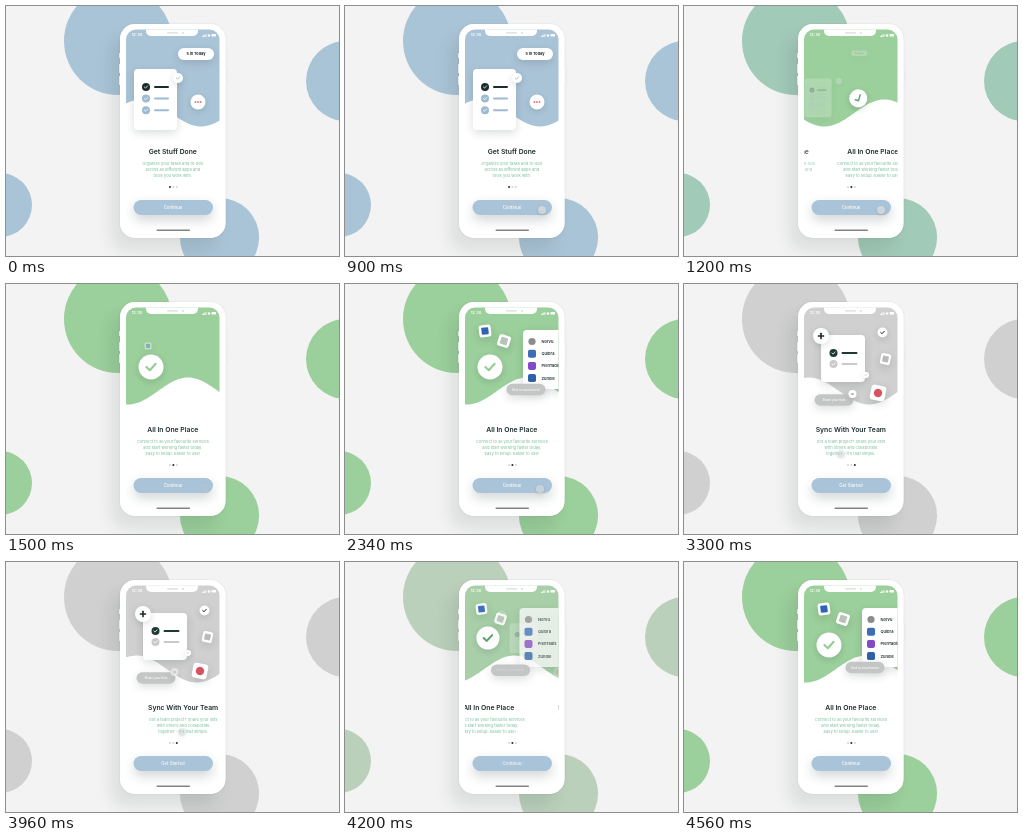
An HTML page with a canvas that plays this animation: 333 px wide and 250 px high, repeating every 4620 ms.

```html
<!DOCTYPE html>
<html lang="en">
<head>
<meta charset="utf-8">
<title>Onboarding</title>
<style>
html, body { margin: 0; width: 100%; height: 100%; overflow: hidden; background: #f3f3f3; }
canvas { display: block; width: 333px; height: 250px; }
</style>
</head>
<body>
<canvas id="stage"></canvas>
<script>
const W = 333, H = 250, LOOP = 4620, STEP = 60;
const canvas = document.getElementById('stage');
const g = canvas.getContext('2d');
const dpr = window.devicePixelRatio || 1;
canvas.width = W * dpr;
canvas.height = H * dpr;

const BLUE = [170, 196, 215], GREEN = [155, 207, 155], GREY = [208, 208, 208];
const INK = '#1c2b2b', BUTTON = '#a9c4d8', COPY = '#78bf9c', SOFT = '#c4c6c5';
// x: scroll position of the page, wave: how far the wave has travelled there.
const PAGES = [
  { x: 0, wave: 0, title: 'Get Stuff Done',
    copy: ['Organize your tasks and to-dos', 'across all different apps and', 'tools you work with.'] },
  { x: 88, wave: 73, title: 'All In One Place',
    copy: ['Connect to all your favourite services', 'and start working faster today.', 'Easy to setup. Easier to use!'] },
  { x: 192, wave: 130, title: 'Sync With Your Team',
    copy: ['Got a team project? Share your lists', 'with others and collaborate', "together - it's that simple."] }
];
const APPS = [['Norvu', '#8c8c8c'], ['Quibra', '#3d6db4'], ['PlenTadis', '#8449c4'], ['Zundle', '#2f62a8']];

const clamp = v => Math.max(0, Math.min(1, v));
const lerp = (a, b, k) => a + (b - a) * k;
const ramp = (t, a, b) => clamp((t - a) / (b - a));
const inOut = u => u < .5 ? 2 * u * u : 1 - 2 * (1 - u) ** 2;
const out = u => 1 - (1 - u) ** 2;
const back = u => 1 + 2.2 * (u - 1) ** 3 + 1.2 * (u - 1) ** 2;
const ease = (t, a, b) => inOut(ramp(t, a, b));
const mix = (a, b, k) => `rgb(${a.map((v, i) => Math.round(lerp(v, b[i], k))).join()})`;

// Value of a page property at a fractional page position.
function between(key, pos) {
  const i = pos < 1 ? 0 : 1;
  return lerp(PAGES[i][key], PAGES[i + 1][key], pos - i);
}

function shadow(alpha, blur, dy, dx = 0) {
  g.shadowColor = `rgba(30,45,50,${alpha})`;
  g.shadowBlur = blur * dpr;
  g.shadowOffsetX = dx * dpr;
  g.shadowOffsetY = dy * dpr;
}
function noShadow() { g.shadowColor = 'transparent'; }

function disc(x, y, r, fill) {
  g.fillStyle = fill;
  g.beginPath();
  g.arc(x, y, r, 0, 7);
  g.fill();
}
function box(x, y, w, h, r, fill) {
  g.fillStyle = fill;
  g.beginPath();
  g.roundRect(x, y, w, h, r);
  g.fill();
}
function text(str, x, y, size, weight, fill, align = 'center') {
  g.font = `${weight} ${size}px Inter, "Open Sans", sans-serif`;
  g.textAlign = align;
  g.textBaseline = 'middle';
  g.fillStyle = fill;
  g.fillText(str, x, y);
}
function tick(x, y, s, color, width) {
  g.strokeStyle = color;
  g.lineWidth = width;
  g.lineCap = g.lineJoin = 'round';
  g.beginPath();
  g.moveTo(x - s, y);
  g.lineTo(x - s * .25, y + s * .7);
  g.lineTo(x + s, y - s * .7);
  g.stroke();
}
function bubble(r, alpha = .16) {
  shadow(alpha, 6, 2);
  disc(0, 0, r, '#fff');
  noShadow();
}
function panel(w, h, r, fill = '#fff') {
  shadow(.16, 8, 3);
  box(-w / 2, -h / 2, w, h, r, fill);
  noShadow();
}

// Draws a part around its own centre.
function place(x, y, scale, alpha, draw, turn = 0) {
  if (alpha <= 0 || scale <= 0) return;
  g.save();
  g.globalAlpha *= Math.min(1, alpha);
  g.translate(x, y);
  g.rotate(turn);
  g.scale(scale, scale);
  draw();
  g.restore();
}

function row(x, y, len, color) {
  disc(x, y, 4, color);
  tick(x, y, 1.6, '#fff', .8);
  box(x + 8, y - 1, len, 2, 1, color);
}

function drawBackdrop(color) {
  g.fillStyle = '#f3f3f3';
  g.fillRect(0, 0, W, H);
  disc(112, 35, 54, color);
  disc(340, 75, 40, color);
  disc(-6, 199, 32, color);
  disc(213.5, 231.5, 39.6, color);
}

function drawPhone() {
  shadow(.1, 16, 13, -9);
  box(114, 18, 105.5, 214, 15, '#fff');
  shadow(.12, 2, 0);
  box(113.2, 47, 2, 5, .5, '#fff');
  box(113.2, 58, 2, 9, .5, '#fff');
  box(113.2, 70, 2, 9, .5, '#fff');
  box(218.4, 62, 2, 17, .5, '#fff');
  box(114, 18, 105.5, 214, 15, '#fff');
  noShadow();
}

function drawWave(color, shift) {
  g.fillStyle = color;
  g.beginPath();
  g.moveTo(118, 20);
  for (let x = 118; x <= 216; x += 2) {
    g.lineTo(x, 107 + 13.5 * Math.cos((x - 195 + shift) / 120 * Math.PI * 2));
  }
  g.lineTo(216, 20);
  g.fill();
}

function drawStatus() {
  box(140, 19, 52, 11, 5, '#fff');
  box(161, 26.3, 11, 1.2, .6, '#dcdcdc');
  disc(177, 26.9, 1, '#dcdcdc');
  text('12:30', 131, 29, 4, 600, '#fff');
  for (let i = 0; i < 4; i++) box(196 + i * 1.2, 30 - i * .7, .8, 1 + i * .7, 0, '#fff');
  disc(203, 29.5, 1.2, '#fff');
  box(205.5, 28, 4.5, 2.6, .7, '#fff');
}

function drawTasks(t) {
  const o = ease(t, 960, 1320), k = 1 - .47 * o, a = 1 - o;
  place(149.5 - 20 * o, 93.5 - 2 * o, k, a, () => {
    panel(43, 61, 4);
    [INK, '#9cbbd2', '#9cbbd2'].forEach((c, i) => row(-9.5, -12.5 + i * 11.6, 15, c));
  });
  place(172 - 22 * o, 72 + 4 * o, k, a, () => {
    bubble(5);
    tick(0, 0, 1.7, '#8aa', .7);
  });
  place(190 - 19 * o, 48 - o, 1 - .7 * o, a, () => {
    panel(36, 12, 6);
    text('5 in Today', 0, .3, 3.8, 700, INK);
  });
  place(192 - 25 * o, 96, k, a, () => {
    bubble(7.5);
    for (let i = -1; i < 2; i++) disc(i * 2.6, 0, .9, '#e2736f');
  });
}

function drawTools(t) {
  const gone = ease(t, 2500, 2740);
  const again = out(ramp(t, 4020, 4380));
  const late = t > 3500;
  const alpha = late ? again : 1 - gone;
  const dx = late ? -14 * (1 - again) : -25 * gone;
  const k = late ? .7 + .3 * again : 1 - .45 * gone;
  const enter = (a, b) => late ? 1 : back(ramp(t, a, b));
  const show = (a, b) => late ? 1 : ramp(t, a, lerp(a, b, .5));

  const e = late ? 1 : ease(t, 1000, 1460);
  const settle = late ? ramp(t, 4140, 4500) : e;
  place(lerp(192, 145, e) + dx * .6, lerp(98, 83, e) - (late ? 28 * (1 - again) : 0),
    lerp(.55, 1, e) * k, alpha * show(1000, 1240) * 1.3, () => {
      bubble(12.5);
      tick(0, 0, 4.6, mix([70, 145, 95], [143, 206, 143], settle), 2);
    }, -.7 * (1 - e));

  const tile = (x, y, a, turn, color) => {
    const s = enter(a, a + 340);
    place(lerp(145, x, s) + dx, lerp(83, y, s), s * k, alpha * show(a, a + 340) * 1.2, () => {
      panel(12, 12, 2.5);
      box(-3.5, -3.5, 7, 7, .8, color);
    }, turn);
  };
  tile(140, 47, 1440, -.12, '#2d64b6');
  tile(159, 57, 1520, .32, '#b5c4b6');

  const s = late ? 1 : out(ramp(t, 1500, 1900));
  place(202.5 + 36 * (1 - s) + dx, 75.5, late ? 1 : 1 - .2 * gone, alpha * show(1500, 1800), () => {
    panel(49, 59, 4);
    APPS.forEach(([name, color], i) => {
      const y = -18 + i * 12.2;
      if (i) box(-19.5, y - 4, 8, 8, 1.8, color);
      else disc(-15.5, y, 3.6, color);
      text(name, -6, y + .2, 4, 600, INK, 'left');
    });
  });
}

function drawTeam(t) {
  const o = ease(t, 3960, 4320);
  const fade = 1 - o, k = 1 - .47 * o, dx = 25 * o;
  const part = (x, y, a, b, draw, turn) => {
    const u = ramp(t, a, b);
    place(x + dx, y + 2 * o, lerp(.5, 1, back(u)) * k, Math.min(1, u * 2) * fade, draw, turn);
  };
  part(159, 74.5, 2560, 2760, () => {
    panel(44, 47, 4);
    row(-9.5, -5.5, 16, '#1c3a33');
    row(-9.5, 5.5, 16, '#c9cbca');
  });
  part(137, 52, 2580, 2760, () => {
    bubble(8);
    box(-3.2, -.8, 6.4, 1.6, .4, INK);
    box(-.8, -3.2, 1.6, 6.4, .4, INK);
  });
  part(198.5, 48.5, 2580, 2760, () => {
    bubble(5);
    tick(0, 0, 1.8, INK, 1);
  });
  part(182, 91, 3060, 3280, () => {
    bubble(3);
    tick(0, 0, 1, '#aab', .5);
  });
  part(201.5, 75, 3060, 3300, () => {
    panel(10, 11, 2);
    box(-3, -3, 6, 6, .5, '#b8babb');
  }, .2);
  part(194, 109, 3060, 3300, () => {
    panel(15, 15, 3);
    disc(0, 0, 4.2, '#d9505f');
  }, .2);
}

function drawPill(t) {
  const leaving = t > 3600;
  const m = leaving ? 1 - ease(t, 3960, 4440) : ease(t, 2520, 3180);
  const bump = leaving ? 0 : Math.sin(Math.PI * m);
  const s = back(ramp(t, 1600, 1900));
  place(lerp(181, 150, m), lerp(105.5, 116, m * m) + 14 * bump, s * (1 - .3 * bump),
    ramp(t, 1600, 1740) * (1 - .4 * bump), () => {
      panel(39, 11.5, 5.75, SOFT);
      const label = (str, a) => place(0, 0, 1, a, () => text(str, 0, .3, 3.1, 500, '#fff'));
      label('And so much more', 1 - m * 1.4);
      label('Share your lists', m * 2.5 - 1.5);
    });
  const c = ramp(t, 3120, 3300);
  place(168.5, 110, back(c), c * (1 - ease(t, 3840, 4080)), () => {
    bubble(4);
    box(-1.5, -.4, 3, .8, .3, '#777');
  });
}

function drawCopy(pos) {
  const scroll = between('x', pos);
  for (const page of PAGES) {
    const off = page.x - scroll;
    place(166.8 + off, 0, 1, clamp(1.5 - Math.abs(off) / 90), () => {
      text(page.title, 0, 146.3, 6.8, 600, INK);
      page.copy.forEach((line, i) => text(line, 0, 157.8 + i * 6, 4.1, 400, COPY));
    });
  }
  const active = Math.round(pos);
  for (let i = 0; i < 3; i++) disc(164 + i * 3.4, 181, 1, i === active ? INK : '#cfd4d4');
}

function drawButton(pos) {
  shadow(.2, 12, 5);
  box(127.5, 194, 79.5, 15, 7.5, BUTTON);
  noShadow();
  const k = clamp(pos - 1);
  const label = (str, a) => place(167, 202, 1, a, () => text(str, 0, 0, 4.3, 500, '#fff'));
  label('Continue', 1 - k);
  label('Get Started', k);
  box(150.5, 223.6, 33.5, 1.4, .7, '#828282');
}

// Each stop: time, x, y, opacity.
const TOUCH = [
  [300, 207, 193, 0], [420, 205, 195, 1], [780, 197, 204, 1], [1380, 197, 204, 1], [1560, 199, 204, 0],
  [1980, 212, 213, 0], [2160, 206, 210, .9], [2340, 195, 205, .9], [2860, 195, 205, .9], [2980, 195, 205, 0],
  [3060, 188, 184, 0], [3300, 157, 170, .5], [3780, 155, 170, .6], [3960, 176, 170, .5], [4140, 200, 170, 0]
];
function drawTouch(t) {
  const i = TOUCH.findIndex(p => p[0] > t);
  if (i < 1) return;
  const a = TOUCH[i - 1], b = TOUCH[i], k = ease(t, a[0], b[0]);
  place(lerp(a[1], b[1], k), lerp(a[2], b[2], k), 1, lerp(a[3], b[3], k), () => {
    shadow(.2, 3, 1);
    disc(0, 0, 4, 'rgba(216,220,223,.85)');
    noShadow();
  });
}

function draw(t) {
  const pos = out(ramp(t, 960, 1440)) + out(ramp(t, 2520, 2760)) - ease(t, 3840, 4380);

  let from = BLUE, to = GREEN, c = ease(t, 960, 1430);
  if (t > 3700) [from, to, c] = [GREY, GREEN, ease(t, 4030, 4410)];
  else if (t > 2400) [from, to, c] = [GREEN, GREY, ease(t, 2480, 2760)];

  g.setTransform(dpr, 0, 0, dpr, 0, 0);
  drawBackdrop(mix(from, to, c));
  drawPhone();

  g.save();
  g.beginPath();
  g.roundRect(120, 23.5, 93.5, 204, 10);
  g.clip();
  drawWave(mix(from, to, clamp(c * 1.9)), between('wave', pos));
  if (t < 1320) drawTasks(t);
  if (t > 2500) drawTeam(t);
  if (t >= 1000) drawTools(t);
  drawPill(t);
  drawStatus();
  drawCopy(pos);
  drawButton(pos);
  g.restore();

  drawTouch(t);
}

const start = performance.now();
function loop() {
  const ms = (performance.now() - start) % LOOP;
  draw(Math.floor(ms / STEP) * STEP);
  requestAnimationFrame(loop);
}
loop();
</script>
</body>
</html>
```
